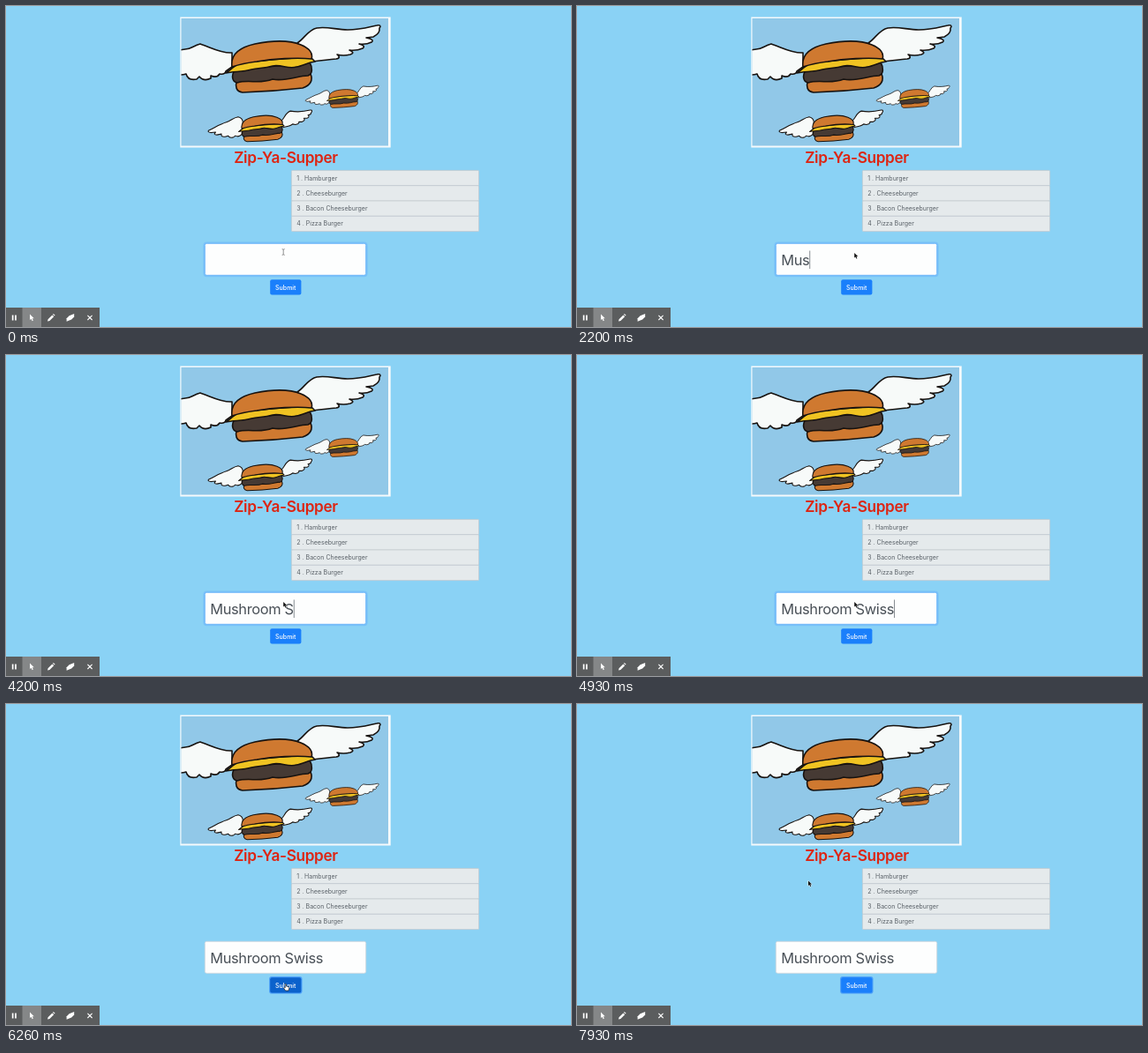
These frames come from a looping animation (640 by 364 pixels, 8000 ms). An HTML page:

```html
<!DOCTYPE html>
<html lang="en">
<head>
<meta charset="utf-8">
<title>Burger list</title>
<style>
  html, body { margin: 0; width: 100%; height: 100%; overflow: hidden; background: #8ad2f5; }
  svg { display: block; width: 640px; height: 364px; }
  text { font-family: Inter, "Open Sans", sans-serif; white-space: pre; }
</style>
</head>
<body>
<svg viewBox="0 0 640 364" xmlns="http://www.w3.org/2000/svg">
  <defs>
    <clipPath id="photo"><rect x="198.5" y="14" width="234.5" height="144.5"/></clipPath>
    <g id="bun">
      <path fill="#cf7930" d="M-41 16C-20 17 10 11 43 8C46 15 43 21 34 24Q0 28-34 29C-42 28-42 22-41 16Z"/>
      <path fill="#463a34" d="M-43 4C-47 10-46 17-40 18C-27 14-15 20 0 14C15 17 28 10 40 10C46 8 45 0 42-5Z"/>
      <path fill="#f0c322" d="M-53 7C-46 2-42-2-38-4Q0-9 43-11L48-6C40-5 34-1 27 0C18 3 10-3 0-1C-10 2-16 1-24 3C-34 6-42 5-53 7Z"/>
      <path fill="#cf7930" d="M-46 0C-48-14-38-22-20-26C0-30 20-30 32-25C42-21 46-15 44-9C28-11 0-9-18-6Q-34-4-46 0Z"/>
    </g>
    <g id="bigWings" fill="#f7faf9">
      <path d="M28-27C36-32 40-42 50-44C62-46 72-42 85-42C100-42 112-46 118-47C122-48 123-46 121-44Q122-38 114-34L106-33Q116-31 112-28Q106-25 98-26Q106-24 102-21Q95-18 87-19Q94-16 88-14Q80-12 73-14Q78-10 72-9Q62-8 45-6Z"/>
      <path d="M-46-16C-58-15-70-22-82-26C-90-24-92-20-99-20L-112-18V8Q-104 10-98 8Q-96 16-86 14L-83 11Q-78 17-70 13L-70 10Q-63 13-60 8Q-54 9-53 5L-46 0Z"/>
    </g>
    <g id="smallWings" fill="#f7faf9">
      <path d="M38-15C48-18 50-36 62-39C78-36 94-38 106-41C111-42 111-38 108-35Q108-31 101-30Q106-26 99-23L92-23Q96-18 88-15L81-15Q82-10 73-9L67-10Q62-5 46-3Z"/>
      <path d="M-44-10C-42-20-48-25-54-26C-66-24-70-17-80-14C-94-10-106-2-119 4C-123 7-118 9-113 9L-104 8Q-110 14-101 14L-91 12Q-93 19-83 18L-76 16Q-73 22-64 19L-60 16Q-53 20-46 13Z"/>
    </g>
    <g id="smallBurger" stroke-width="2.1"><use href="#smallWings"/><use href="#bun"/></g>
    <path id="arrow" d="M0 0V5.6L1.3 4.5L2.2 6.6L3.2 6.2L2.3 4.1H4Z"/>
  </defs>

  <rect width="640" height="364" fill="#8ad2f5"/>
  <rect x="197.3" y="12.5" width="238.4" height="148" fill="#f5fafc"/>
  <rect x="198.5" y="14" width="234.5" height="144.5" fill="#91c8e8"/>
  <g clip-path="url(#photo)" stroke="#17120f" stroke-width="1.6" stroke-linejoin="round">
    <g transform="translate(302 69)"><use href="#bigWings"/><use href="#bun"/></g>
    <use href="#smallBurger" transform="translate(290.5 139) scale(.51)"/>
    <use href="#smallBurger" transform="translate(382.5 105) scale(.36)"/>
  </g>

  <text x="317" y="178" text-anchor="middle" font-size="17.2" font-weight="600" letter-spacing="-.02em" fill="#de2411">Zip-Ya-Supper</text>
  <g id="list"></g>

  <rect id="ring" x="224.4" y="268.4" width="184.2" height="37.8" rx="3" fill="none" stroke="#6cb6fb" stroke-width="2" opacity=".6"/>
  <rect id="field" x="225.3" y="269.3" width="182.4" height="36" rx="2" fill="#fdfefe" stroke-width=".9"/>
  <text id="typed" x="231.2" y="294.2" font-size="16.4" letter-spacing="-.02em" fill="#495057"></text>
  <rect id="caret" y="277.5" width=".8" height="20.5" fill="#6b7177"/>

  <rect id="glow" x="298.1" y="309.1" width="37.4" height="19.4" rx="2.8" fill="#4a9ef8"/>
  <rect id="button" x="299.2" y="310.2" width="35.2" height="17.2" rx="2"/>
  <text x="316.8" y="321.5" text-anchor="middle" font-size="7" font-weight="500" fill="#fff">Submit</text>

  <g>
    <rect y="342" width="106" height="22" fill="#5b5d5e"/>
    <rect x="18.5" y="342" width="21.5" height="22" fill="#858788"/>
    <g fill="#fff">
      <path d="M6.8 350.4h1.7v6.2H6.8zM10.1 350.4h1.7v6.2h-1.7z"/>
      <use href="#arrow" transform="translate(27 349.4) scale(1.2)"/>
      <path d="M47 357.6l.6-2.4 4.8-4.8 1.8 1.8-4.8 4.8zM53 349.8l.8-.8 1.8 1.8-.8.8z"/>
      <path d="M68.6 354.2l3-3 5.6-2.2v3.6l-3 3-5.6 2.2z"/>
    </g>
    <path d="M92.4 350.8l5.2 5.2m0-5.2l-5.2 5.2" stroke="#fff" stroke-width="1.1"/>
  </g>

  <g id="pointer">
    <use id="asArrow" href="#arrow" fill="#111" stroke="#fff" stroke-width=".8" paint-order="stroke"/>
    <path id="asBeam" d="M-1.5-3.4Q0-3.4 0-2.4V2.4Q0 3.4-1.5 3.4M1.5-3.4Q0-3.4 0-2.4M0 2.4Q0 3.4 1.5 3.4" fill="none" stroke="#777" stroke-width=".8"/>
    <path id="asHand" d="M-.6-.4Q0-1 .6-.4V2L3.4 2.7Q4.2 3 4 4L3.3 7H-.2L-2.3 4.2Q-2.3 3.2-.6 4Z" fill="#fff" stroke="#222" stroke-width=".7"/>
  </g>
</svg>
<script>
const LOOP = 8000;
const $ = id => document.getElementById(id);
const set = (id, name, value) => $(id).setAttribute(name, value);
const show = (id, on) => set(id, "visibility", on ? "visible" : "hidden");

const burgers = ["Hamburger", "Cheeseburger", "Bacon Cheeseburger", "Pizza Burger"];
const rowHeight = 17.3;
$("list").innerHTML = burgers.map((name, i) => {
  const y = 186.4 + i * rowHeight;
  return `<rect x="323.4" y="${y}" width="212.2" height="${rowHeight}" rx="1.2" fill="#e5eaec" stroke="#c3cbd0" stroke-width=".8"/>
    <text x="329.3" y="${y + 11.1}" font-size="7" fill="#596067">${i + 1} . ${name}</text>`;
}).join("");

const phrase = "Mushroom Swiss";
const keyTimes = [1660, 1860, 2060, 2260, 2460, 2660, 2860, 3130, 3400, 4060, 4330, 4530, 4730, 4860];

// Pointer stops: time, x, y
const stops = [
  [0, 314.2, 279], [60, 314.2, 280], [5400, 314.2, 280], [6130, 316.8, 318],
  [7330, 316.8, 318], [7660, 265, 208], [7930, 262, 200.5], [LOOP, 262, 200.5]
];

function pointerAt(t) {
  const i = stops.findIndex(s => s[0] > t);
  const [t0, x0, y0] = stops[i - 1], [t1, x1, y1] = stops[i];
  const p = (t - t0) / (t1 - t0), e = p * p * (3 - 2 * p);
  return [x0 + (x1 - x0) * e, y0 + (y1 - y0) * e];
}

function caretOn(t) {
  if (t < 1600) return (t >= 200 && t < 600) || t >= 1100;
  if (t < 5400) return !(t >= 3900 && t < 4060);
  return t >= 5900 && t < 6200;
}

function draw(t) {
  const count = keyTimes.filter(k => k <= t).length;
  const focused = t < 6200;
  $("typed").textContent = phrase.slice(0, count);
  const width = count ? $("typed").getComputedTextLength() : 0;
  set("caret", "x", 231.2 + width);
  show("caret", caretOn(t));
  show("ring", focused);
  set("field", "stroke", focused ? "#69b3fa" : "#ced8df");

  const [x, y] = pointerAt(t);
  const overButton = x > 299 && x < 335 && y > 310 && y < 328;
  const overField = x > 225 && x < 408 && y > 269 && y < 306;
  const beam = overField && (t < 200 || t >= 5400);
  const pressed = t >= 6200 && t < 6400;
  set("button", "fill", pressed ? "#0b62cc" : overButton ? "#0d69d8" : "#1a7ffb");
  show("glow", !focused);

  set("pointer", "transform", `translate(${x} ${y})`);
  show("asHand", overButton);
  show("asBeam", beam);
  show("asArrow", !overButton && !beam);
}

function tick() {
  draw(performance.now() % LOOP);
  requestAnimationFrame(tick);
}
tick();
</script>
</body>
</html>
```
